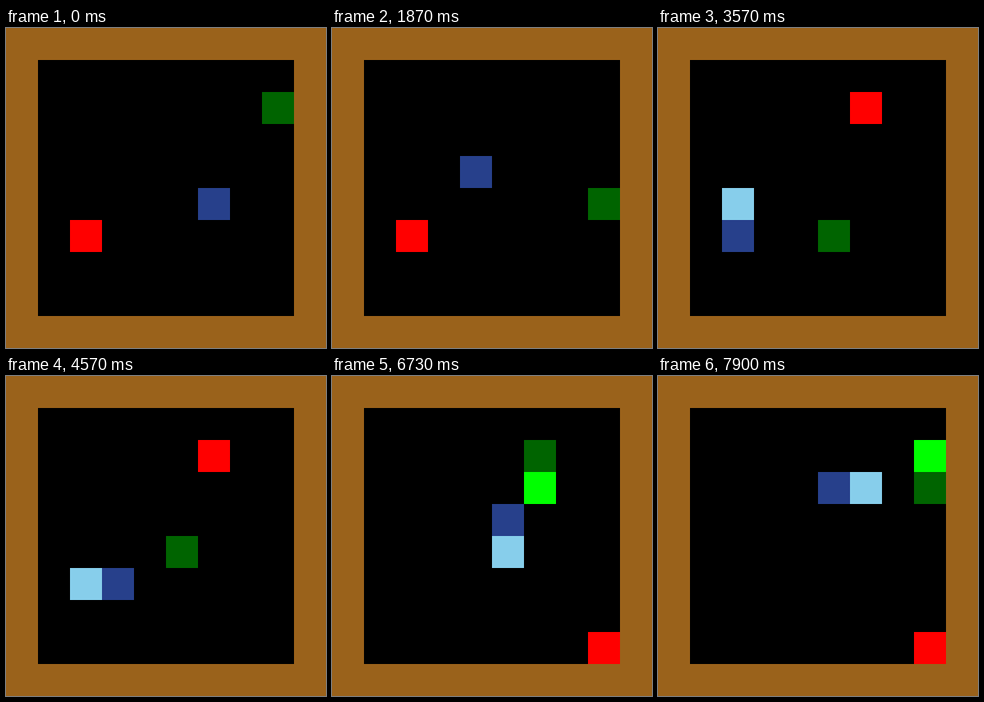
An HTML page for the animation above (8000 ms loop, 400 px wide and 400 px high).

```html
<!DOCTYPE html>
<html lang="en">
<head>
<meta charset="utf-8">
<title>Two snakes</title>
<style>
  html, body { margin: 0; width: 100%; height: 100%; overflow: hidden; background: #9a621b; }
  svg { display: block; width: 100%; height: 100%; }
</style>
</head>
<body>
<svg id="stage" viewBox="0 0 400 400" shape-rendering="crispEdges">
  <rect width="400" height="400" fill="#9a621b"/>
  <rect x="40" y="40" width="320" height="320" fill="#000"/>
</svg>
<script>
const CELL = 40;
const LOOP = 8000;
const FIRST_MOVE = 332;
const MOVE_EVERY = 538;
const STEPS = { U: [0, -1], D: [0, 1], L: [-1, 0], R: [1, 0] };

const stage = document.getElementById('stage');

function addCell(fill) {
  const rect = document.createElementNS('http://www.w3.org/2000/svg', 'rect');
  rect.setAttribute('width', CELL);
  rect.setAttribute('height', CELL);
  rect.setAttribute('fill', fill);
  stage.append(rect);
  return rect;
}

function place(rect, [col, row]) {
  rect.setAttribute('x', col * CELL);
  rect.setAttribute('y', row * CELL);
}

function walk(start, moves) {
  const path = [start];
  for (const move of moves) {
    const [col, row] = path[path.length - 1];
    const [dx, dy] = STEPS[move];
    path.push([col + dx, row + dy]);
  }
  return path;
}

// Each snake gains one body cell on the move at which it eats.
function makeSnake(start, moves, eatsAt, headFill, bodyFill) {
  return {
    path: walk(start, moves),
    eatsAt,
    body: addCell(bodyFill),
    head: addCell(headFill)
  };
}

const food = addCell('#ff0000');
const blue = makeSnake([6, 5], 'ULLLLDDRRRUURUL', 7, '#27408b', '#87ceeb');
const green = makeSnake([8, 2], 'DDDDLLLUUURURRD', 12, '#006400', '#00ff00');

function drawSnake(snake, move) {
  const grown = move >= snake.eatsAt;
  place(snake.head, snake.path[move]);
  snake.body.setAttribute('visibility', grown ? 'visible' : 'hidden');
  if (grown) place(snake.body, snake.path[move - 1]);
}

function foodCell(move) {
  if (move < blue.eatsAt) return [2, 6];
  if (move < green.eatsAt) return [6, 2];
  return [8, 8];
}

function draw(time) {
  const move = Math.max(0, Math.floor((time - FIRST_MOVE) / MOVE_EVERY) + 1);
  place(food, foodCell(move));
  drawSnake(blue, move);
  drawSnake(green, move);
}

const startTime = performance.now();

function tick() {
  draw((performance.now() - startTime) % LOOP);
  requestAnimationFrame(tick);
}

tick();
</script>
</body>
</html>
```
